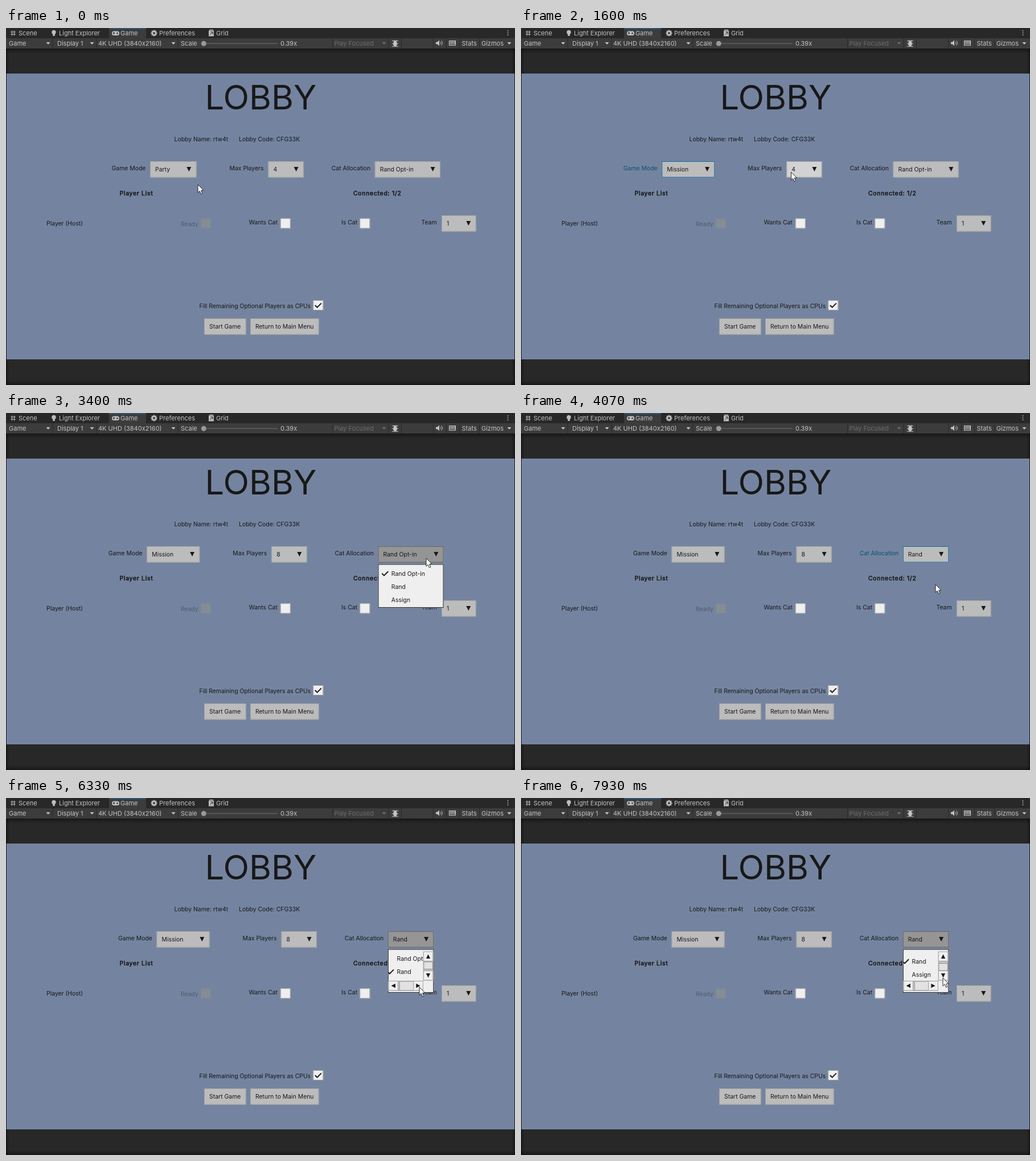
An HTML page with a canvas that plays this animation: 894x627 px, repeating every 8000 ms.

```html
<!DOCTYPE html>
<html>
<head>
<meta charset="utf-8">
<style>
html, body { margin: 0; width: 894px; height: 627px; overflow: hidden; background: #282828; }
canvas { display: block; }
</style>
</head>
<body>
<canvas id="stage" width="894" height="627"></canvas>
<script>
const ctx = document.getElementById('stage').getContext('2d');
const LOOP = 8000, STEP = 1000 / 15;
const INK = '#181818', BLUE = '#006aa7', TEAL = '#0b5273', PAPER = '#efefef';
const ROW = 23.2, LIST_Y = 265.5, FIELD_Y = 234;
const TEXT = 10.43;

// cursor keys: time, x, y
const PATH = [
  [0, 337, 275], [330, 305, 253], [600, 305, 253], [1070, 298, 358],
  [1330, 298, 358], [1600, 474.5, 253], [1900, 484, 254], [2130, 490, 300],
  [2600, 500, 423], [2800, 500, 423], [3200, 736, 253], [3400, 738, 255],
  [3600, 734, 282], [3800, 728, 301], [4070, 728, 301], [4330, 714, 259],
  [4600, 714, 259], [4730, 709, 308], [5130, 709, 308], [5470, 697, 318],
  [5870, 706, 323], [6000, 706, 323], [6270, 726, 332], [6470, 726, 332],
  [6870, 724, 301], [7130, 740, 276], [7530, 741, 299], [7600, 741, 299],
  [7800, 741, 316], [8000, 741, 316]
];

const MODES = ['Party', 'Teams', 'Solo', 'Mission', 'Custom'];
const COUNTS = ['2', '3', '4', '5', '6', '7', '8'];
const ALLOCS = ['Rand Opt-in', 'Rand', 'Assign'];

const between = (t, a, b) => t >= a && t < b;
const ramp = (t, a, b) => Math.min(1, Math.max(0, (t - a) / (b - a)));

function cursorAt(t) {
  const i = Math.max(1, PATH.findIndex(k => k[0] > t));
  const [a, b] = [PATH[i - 1], PATH[i]];
  const u = ramp(t, a[0], b[0]), e = u * u * (3 - 2 * u);
  return { x: a[1] + (b[1] - a[1]) * e, y: a[2] + (b[2] - a[2]) * e };
}

function rect(x, y, w, h, fill, line) {
  ctx.fillStyle = fill;
  ctx.fillRect(x, y, w, h);
  if (line) {
    ctx.strokeStyle = line;
    ctx.lineWidth = 1;
    ctx.strokeRect(x + .5, y + .5, w - 1, h - 1);
  }
}

// y is the middle of the capitals
function text(s, x, y, color = INK, size = TEXT, align = 'left') {
  ctx.font = `${size}px Inter, sans-serif`;
  ctx.textAlign = align;
  ctx.fillStyle = color;
  ctx.fillText(s, x, y + size * .364);
}

function heading(s, x, y) {
  ctx.letterSpacing = '.73px';
  text(s, x, y);
  ctx.strokeStyle = INK;
  ctx.lineWidth = .55;
  ctx.strokeText(s, x, y + TEXT * .364);
  ctx.letterSpacing = '0px';
}

function poly(points, fill) {
  ctx.beginPath();
  points.forEach(([x, y]) => ctx.lineTo(x, y));
  ctx.closePath();
  ctx.fillStyle = fill;
  ctx.fill();
}

function line(points, color, width = 1) {
  ctx.beginPath();
  points.forEach(([x, y], i) => i ? ctx.lineTo(x, y) : ctx.moveTo(x, y));
  ctx.strokeStyle = color;
  ctx.lineWidth = width;
  ctx.stroke();
}

function disc(x, y, r, color) {
  ctx.beginPath();
  ctx.arc(x, y, r, 0, 7);
  ctx.fillStyle = color;
  ctx.fill();
}

// triangle pointing along a quarter turn: 0 right, 1 down, 2 left, 3 up
function arrow(x, y, turn, r = 4, color = INK) {
  ctx.save();
  ctx.translate(x, y);
  ctx.rotate(turn * Math.PI / 2);
  poly([[-r, -r], [r, 0], [-r, r]], color);
  ctx.restore();
}

const caret = (x, color = '#c4c4c4') => poly([[x - 3.5, 25], [x + 3.5, 25], [x, 29]], color);
const tick = (x, y, color = INK) => line([[x, y], [x + 3.8, y + 3.6], [x + 11, y - 3.6]], color, 2);

function checkbox(x, y, on) {
  rect(x, y, 18, 18, PAPER, '#9a9a9a');
  if (on) tick(x + 3.5, y + 9);
}

function button(label, x, w) {
  rect(x, 510, w, 28.5, '#bcbcbc', '#a2a2a2');
  text(label, x + w / 2, 524, INK, TEXT, 'center');
}

function field(f, y, hover) {
  text(f.label, f.labelX, y + 12.3, f.focus ? TEAL : INK);
  const fill = f.open ? '#959595' : hover ? '#d2d2d2' : '#bcbcbc';
  const edge = f.open ? '#666' : f.focus ? '#0f6c9e' : '#a2a2a2';
  rect(f.x, y, f.w, 28.5, fill, edge);
  text(f.value, f.x + 9, y + 14.2);
  arrow(f.x + f.w - 13.2, y + 14, 1);
}

function scrollButton(x, y, turn) {
  rect(x, y, 17.5, 17.5, PAPER, '#a0a0a0');
  arrow(x + 8.7, y + 8.7, turn, 3.7);
}

function scrollbars(x, sx, sy) {
  const vx = x + 62, hy = 321;
  rect(vx, 270, 17.5, 51, '#c4c4c4', '#a0a0a0');
  rect(vx + .5, 287.5 + sy * 2.5, 16.5, 13.5, '#e2e2e2', '#8e8e8e');
  scrollButton(vx, 269.5, 3);
  scrollButton(vx, 303, 1);
  rect(x + 1, hy, 61, 18, '#c4c4c4', '#a0a0a0');
  rect(x + 18 + sx * 2, hy + .5, 25.5, 17, '#e2e2e2', '#8e8e8e');
  scrollButton(x + .7, hy, 2);
  scrollButton(x + 44.5, hy, 0);
}

function list(f, mouse, scroll) {
  const h = f.items.length * ROW + 7;
  const viewW = scroll ? 61.5 : f.w - 2, viewH = scroll ? 51 : h - 7;
  const dx = scroll ? scroll.x * 7.5 : 0, dy = scroll ? scroll.y * 18.2 : 0;
  const inside = between(mouse.x, f.x, f.x + viewW) && between(mouse.y, 270, 270 + viewH);
  rect(f.x, LIST_Y, f.w, h, PAPER, '#202020');
  ctx.save();
  ctx.beginPath();
  ctx.rect(f.x + 1, 270, viewW, viewH);
  ctx.clip();
  f.items.forEach((item, i) => {
    const y = 270 + i * ROW - dy;
    const hot = inside && between(mouse.y, y, y + ROW);
    if (hot) rect(f.x + 1, y, viewW, ROW, BLUE);
    const color = hot ? '#fff' : INK;
    if (item === f.value) tick(f.x + 6.7 - dx, y + 11.8, color);
    text(item, f.x + 23.3 - dx, y + 12, color);
  });
  ctx.restore();
  if (scroll) scrollbars(f.x, scroll.x, scroll.y);
}

function tabs() {
  const c = '#bdbdbd', k = '#282828';
  rect(0, 0, 894, 18, k);
  rect(181, 0, 65, 18, '#3c3c3c');
  rect(181, 0, 65, 1.5, '#2c5d87');
  [['Scene', 22], ['Light Explorer', 93], ['Game', 201], ['Preferences', 269], ['Grid', 369]]
    .forEach(([s, x]) => text(s, x, 9.3, '#c4c4c4', 11));
  for (const d of [-2, 2]) {
    line([[8, 9 + d], [17, 9 + d]], c);
    line([[12.5 + d, 4.5], [12.5 + d, 13.5]], c);
  }
  disc(84, 7.5, 3.7, c);
  rect(82.3, 10, 3.5, 4, c);
  ctx.beginPath();
  ctx.roundRect(186, 5.5, 13, 7.5, 3.5);
  ctx.fillStyle = c;
  ctx.fill();
  line([[187.5, 9], [191.5, 9]], k);
  line([[189.5, 7], [189.5, 11]], k);
  disc(195.5, 9.2, 1.2, k);
  for (let i = 0; i < 4; i++) {
    const a = i * Math.PI / 4, u = Math.cos(a) * 5.5, v = Math.sin(a) * 5.5;
    line([[260 - u, 9 - v], [260 + u, 9 + v]], c, 2.4);
  }
  disc(260, 9, 4, c);
  disc(260, 9, 1.8, k);
  rect(356, 4.5, 9, 10, c);
  rect(357, 2.8, 7, 1.2, c);
  line([[358, 12], [363, 7], [359.5, 7]], k);
  line([[363, 7], [363, 11]], k);
  for (let i = 0; i < 3; i++) disc(881.5, 5 + i * 3.5, .9, c);
}

function toolbar() {
  const c = '#c4c4c4', dim = '#6c6c6c';
  rect(0, 18, 894, 18, '#3c3c3c');
  [81.5, 158.5, 301.5, 573, 671.5, 694, 750, 773, 796, 831]
    .forEach(x => rect(x, 18, 1, 18, '#282828'));
  [['Game', 5], ['Display 1', 90], ['4K UHD (3840x2160)', 162], ['Scale', 307],
   ['0.39x', 482], ['Stats', 800.5], ['Gizmos', 835]]
    .forEach(([s, x]) => text(s, x, 27, c, 11));
  text('Play Focused', 576.5, 27, dim, 11);
  [74, 151, 294, 884].forEach(x => caret(x));
  caret(664, dim);
  rect(347, 26.5, 130, 1.5, '#5e5e5e');
  disc(347.3, 27.2, 4.5, '#999');
  ctx.beginPath();
  ctx.ellipse(683.5, 27.5, 3.4, 5, 0, 0, 7);
  ctx.fillStyle = c;
  ctx.fill();
  for (const y of [23.5, 27.5, 31.5]) line([[678, y + (y - 27.5) * .2], [689, y + (y - 27.5) * .2]], c);
  line([[681, 21], [683.5, 24], [686, 21]], c);
  poly([[755, 24.8], [757.5, 24.8], [761, 21.5], [761, 31.5], [757.5, 28.3], [755, 28.3]], c);
  for (const r of [2.5, 5]) {
    ctx.beginPath();
    ctx.arc(761.5, 26.5, r, -1, 1);
    ctx.stroke();
  }
  ctx.strokeRect(778.5, 22.5, 11, 8);
  for (const y of [25, 28]) line([[779, y], [789, y]], c);
  for (let x = 781; x < 789; x += 2.5) line([[x, 23], [x, 28]], c, .8);
}

function shade(x, y, w, h, x2, y2) {
  const g = ctx.createLinearGradient(x, y, x2, y2);
  g.addColorStop(0, 'rgba(0,0,0,.4)');
  g.addColorStop(1, 'rgba(0,0,0,0)');
  ctx.fillStyle = g;
  ctx.fillRect(x, y, w, h);
}

function backdrop() {
  rect(0, 0, 894, 627, '#282828');
  shade(0, 36, 894, 9, 0, 45);
  ctx.save();
  ctx.translate(0, 627);
  ctx.scale(1, -1);
  shade(0, 0, 894, 8, 0, 8);
  ctx.restore();
  shade(0, 36, 6, 591, 6, 36);
  ctx.save();
  ctx.translate(894, 0);
  ctx.scale(-1, 1);
  shade(0, 36, 6, 591, 6, 36);
  ctx.restore();
  rect(1, 80, 892, 502, '#7484a0');
  tabs();
  toolbar();
}

function lobby() {
  text('LOBBY', 447.5, 121, INK, 59.6, 'center');
  text('Lobby Name: rtw4t', 295.5, 195);
  text('Lobby Code: CFG33K', 409, 195);
  heading('Player List', 199.5, 290);
  heading('Connected: 1/2', 610, 290);
  text('Player (Host)', 71, 343.5);
  text('Ready', 307, 344, '#505b6d');
  rect(342, 334.5, 18, 17.5, '#848c95', '#7f8892');
  text('Wants Cat', 426.5, 341.5);
  checkbox(481.8, 334.2);
  text('Is Cat', 589, 341.5);
  checkbox(621.3, 334.2);
  field({ label: 'Team', labelX: 729.5, x: 765, w: 60.5, value: '1' }, 329);
  text('Fill Remaining Optional Players as CPUs', 339.5, 488);
  checkbox(539.3, 478, true);
  button('Start Game', 348, 73.5);
  button('Return to Main Menu', 429, 120.5);
}

function fieldsAt(t) {
  const mission = t >= 1330, rand = t >= 4060;
  const modeW = mission ? 93 : 81.5, allocW = rand ? 80.5 : 115;
  const left = 185.5 - (modeW - 81.5) / 2 + (115 - allocW) / 2;
  const maxLabel = left + 67.5 + modeW + 58;
  const allocLabel = maxLabel + 179;
  return [
    { label: 'Game Mode', labelX: left, x: left + 67.5, w: modeW, items: MODES,
      value: mission ? 'Mission' : 'Party',
      open: between(t, 395, 1330), focus: between(t, 1330, 1860) },
    { label: 'Max Players', labelX: maxLabel, x: maxLabel + 68, w: 62.3, items: COUNTS,
      value: t >= 2795 ? '8' : '4',
      open: between(t, 1860, 2795), focus: between(t, 2795, 3330) },
    { label: 'Cat Allocation', labelX: allocLabel + .2, x: allocLabel + 76.3, w: allocW, items: ALLOCS,
      value: rand ? 'Rand' : 'Rand Opt-in',
      open: between(t, 3330, 4060) || t >= 4460, focus: between(t, 4060, 4460) }
  ];
}

function drawCursor({ x, y }) {
  ctx.save();
  ctx.translate(x, y);
  poly([[0, 0], [0, 14.2], [3.2, 11.3], [5.5, 16.6], [7.9, 15.6], [5.7, 10.4], [9.8, 10.1]], '#fff');
  ctx.strokeStyle = '#111';
  ctx.lineWidth = .9;
  ctx.stroke();
  ctx.restore();
}

function draw(t) {
  const mouse = cursorAt(t);
  const fields = fieldsAt(t);
  const open = fields.find(f => f.open);
  backdrop();
  lobby();
  for (const f of fields) {
    const over = between(mouse.x, f.x, f.x + f.w) && between(mouse.y, FIELD_Y, FIELD_Y + 28.5);
    field(f, FIELD_Y, over && !open);
  }
  const scroll = t >= 4460 && { x: ramp(t, 6200, 6320), y: ramp(t, 7730, 7920) };
  if (open) list(open, mouse, scroll);
  drawCursor(mouse);
}

const start = performance.now();
function tick60() {
  const t = (performance.now() - start) % LOOP;
  draw(Math.floor((t + 4) / STEP) * STEP % LOOP);
  requestAnimationFrame(tick60);
}
tick60();
</script>
</body>
</html>
```
